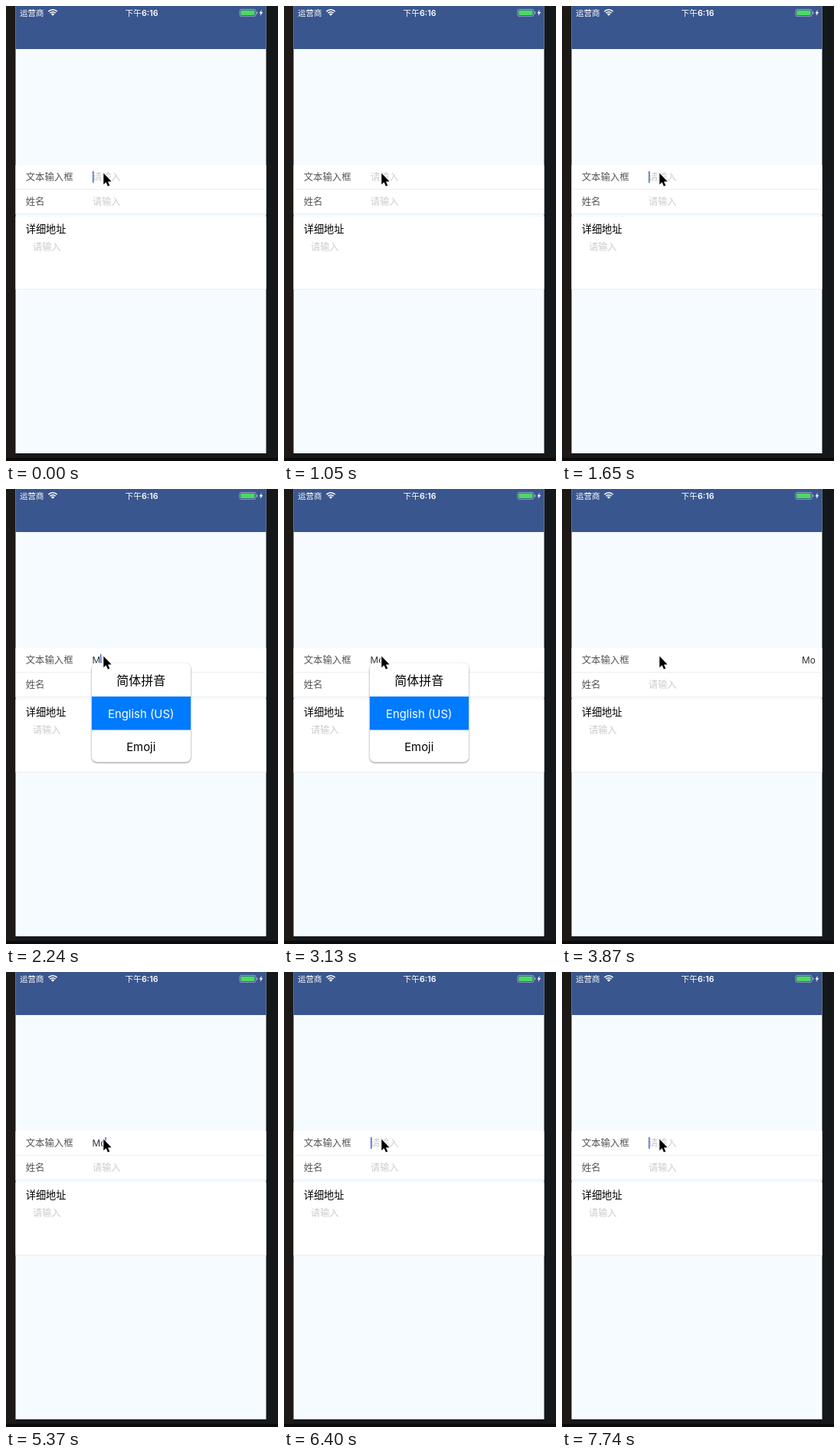
An HTML page with a canvas that plays this animation: 355x592 px, repeating every 8000 ms.

```html
<!DOCTYPE html>
<html lang="zh-CN">
<head>
<meta charset="utf-8">
<style>
  html, body { margin: 0; width: 100%; height: 100%; overflow: hidden; background: #161718; }
  canvas { display: block; width: 355px; height: 592px; }
</style>
</head>
<body>
<canvas></canvas>
<script>
const W = 355, H = 592, LOOP = 8000;
const CJK = '"Noto Sans CJK SC", "Noto Sans CJK", "Noto Sans CJK JP", sans-serif';
const LATIN = 'Inter, sans-serif';
const BLUE = '#007aff';

const canvas = document.querySelector('canvas');
const dpr = window.devicePixelRatio || 1;
canvas.width = Math.round(W * dpr);
canvas.height = Math.round(H * dpr);
const ctx = canvas.getContext('2d');
ctx.scale(dpr, dpr);

// Each step: start time, typed text, caret opacity, selected menu row (-1: closed), right aligned
const steps = [
  [0, '', 1], [150, '', 0], [600, '', 1], [1050, '', 0],
  [1200, '', 1], [1500, '', 0], [1650, '', 1],
  [2240, 'M', 1, 1], [2390, 'Mo', 1, 1], [2980, 'Mo', 0.12, 1], [3130, 'Mo', 0, 1],
  [3430, 'Mo', 1, 0], [3870, 'Mo', 0, -1, true],
  [5370, 'Mo', 1], [5960, 'Mo', 0.12], [6110, 'Mo', 0],
  [6250, 'M', 1], [6400, '', 1], [6850, 'M', 1], [7000, 'Mo', 1],
  [7590, 'M', 1], [7740, '', 1]
];
const caretX = [113, 123, 129.3];

function rect(x, y, w, h, color) {
  ctx.fillStyle = color;
  ctx.fillRect(x, y, w, h);
}

function text(str, x, y, size, color, family = CJK, align = 'left', weight = 400) {
  ctx.font = `${weight} ${size}px ${family}`;
  ctx.textAlign = align;
  ctx.fillStyle = color;
  ctx.fillText(str, x, y);
}

function polygon(points) {
  ctx.beginPath();
  points.forEach(([x, y]) => ctx.lineTo(x, y));
  ctx.closePath();
}

function roundRect(x, y, w, h, r) {
  ctx.beginPath();
  ctx.roundRect(x, y, w, h, r);
}

function drawWifi() {
  const cx = 61, cy = 12.8, from = -Math.PI * 0.75, to = -Math.PI * 0.25;
  ctx.strokeStyle = ctx.fillStyle = '#fff';
  ctx.lineWidth = 1.6;
  for (const r of [8, 5.1]) {
    ctx.beginPath();
    ctx.arc(cx, cy, r, from, to);
    ctx.stroke();
  }
  ctx.beginPath();
  ctx.moveTo(cx, cy);
  ctx.arc(cx, cy, 3.2, from, to);
  ctx.fill();
}

function drawBattery() {
  ctx.strokeStyle = 'rgba(255,255,255,.55)';
  ctx.lineWidth = 0.8;
  roundRect(305, 4.4, 21, 9, 2);
  ctx.stroke();
  ctx.fillStyle = '#4cd964';
  roundRect(306.3, 5.7, 18.2, 6.4, 1);
  ctx.fill();
  rect(327, 7.4, 1.2, 3, 'rgba(255,255,255,.55)');
  polygon([[333.8, 4.8], [330.5, 9.6], [332.5, 9.6], [331.6, 13], [335.2, 8], [333.1, 8]]);
  ctx.fillStyle = '#fff';
  ctx.fill();
}

function drawScreen() {
  rect(0, 0, W, H, '#15181b');
  rect(0, 0, 13, H, '#1c1917');
  rect(0, 588, W, 4, '#0d0a0c');
  rect(12.5, 0, 327, 582, '#f6fbff');
  rect(12.5, 0, 327, 56, '#3a568e');

  text('运营商', 18, 13, 10.5, '#fff');
  drawWifi();
  text('下午', 155.5, 13, 10.7, '#fff', CJK, 'left', 500);
  text('6:16', 177, 12.8, 10.7, '#fff', LATIN, 'left', 600);
  drawBattery();

  rect(12.5, 207, 327, 63, '#fff');
  rect(12.5, 274, 327, 94, '#fff');
  for (const y of [238, 270, 368]) rect(12.5, y, 327, 1, '#ebeef0');

  text('文本输入框', 25.7, 227, 12.4, '#555');
  text('姓名', 25.7, 258.6, 12.4, '#555');
  text('请输入', 113, 258.6, 12.2, '#ccc');
  text('详细地址', 25.7, 295, 13.2, '#000');
  text('请输入', 35, 317.7, 12.2, '#ccc');
}

function drawField(value, caret, right) {
  if (value) text(value, right ? 330.8 : 112.6, 227, 11.8, '#333', LATIN, right ? 'right' : 'left');
  else text('请输入', 113, 227, 12.2, '#ccc');
  ctx.globalAlpha = caret;
  rect(caretX[value.length], 215, 1.5, 15, '#4a66d0');
  ctx.globalAlpha = 1;
}

function drawMenu(selected) {
  const x = 111.8, y = 226.2, w = 129.4, h = 129.3, row = 43.6;
  ctx.save();
  ctx.shadowColor = 'rgba(0,0,0,.55)';
  ctx.shadowBlur = 2 * dpr;
  ctx.shadowOffsetY = 0.7 * dpr;
  ctx.fillStyle = '#fff';
  roundRect(x, y, w, h, 7);
  ctx.fill();
  ctx.restore();

  ctx.save();
  roundRect(x, y, w, h, 7);
  ctx.clip();
  if (selected === 0) rect(x, 313, w, 1, '#e4e4e4');
  rect(x, selected ? 270 : y, w, selected ? 43.5 : 43.8, BLUE);
  ctx.restore();

  ['简体拼音', 'English (US)', 'Emoji'].forEach((label, i) => {
    const color = i === selected ? '#fff' : '#000';
    const baseline = (i ? 253.9 : 254.5) + i * row;
    text(label, 176.2, baseline, i ? 14.9 : 16, color, i ? LATIN : CJK, 'center');
  });
}

function drawPointer() {
  polygon([[127.3, 217.5], [127.3, 232.2], [130.6, 229.2], [132.9, 234.6],
           [135.3, 233.6], [133, 228.4], [137.6, 228.2]]);
  ctx.lineJoin = 'round';
  ctx.lineWidth = 1.8;
  ctx.strokeStyle = '#fff';
  ctx.stroke();
  ctx.fillStyle = '#000';
  ctx.fill();
}

function draw(now) {
  const t = now % LOOP;
  const [, value, caret, selected = -1, right = false] = steps.findLast(s => s[0] <= t) || steps[0];
  drawScreen();
  drawField(value, caret, right);
  if (selected >= 0) drawMenu(selected);
  drawPointer();
}

const start = performance.now();
function tick() {
  draw(performance.now() - start);
  requestAnimationFrame(tick);
}
tick();
</script>
</body>
</html>
```
